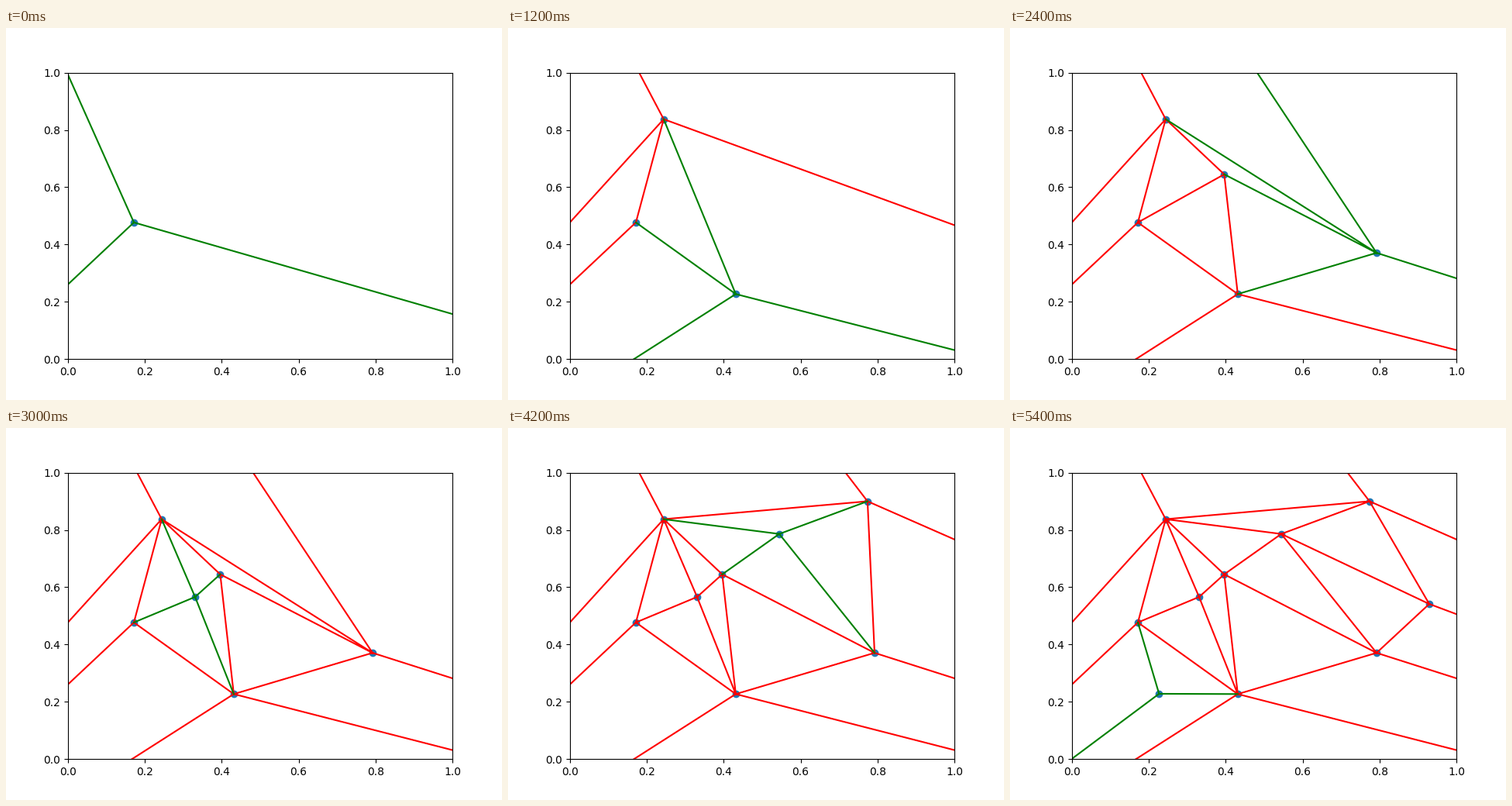
Recreate the animation shown at these times as a matplotlib script. Size 640 by 480 pixels, loop 6 s.

```python
import matplotlib.pyplot as plt
import numpy as np
from matplotlib.animation import FuncAnimation

# Corners of the enclosing triangle
NODES = {"A": (-1, 4), "B": (4, -1), "C": (-1, -1)}

# Each step: x, y, nodes joined to the new point, edges flipped away
STEPS = [
    (0.1714, 0.4770, "ABC", []),
    (0.2437, 0.8375, "ABC0", ["0A"]),
    (0.4312, 0.2270, "BC01", ["0B"]),
    (0.3960, 0.6450, "B012", ["12"]),
    (0.7923, 0.3708, "AB123", ["1B", "3B"]),
    (0.3306, 0.5660, "0123", ["03"]),
    (0.7740, 0.9000, "AB134", ["4A", "14"]),
    (0.5444, 0.7860, "1346", ["36"]),
    (0.9294, 0.5415, "B467", ["46"]),
    (0.2265, 0.2280, "C02", []),
]
for i, (x, y, _, _) in enumerate(STEPS):
    NODES[str(i)] = (x, y)


def edge(a, b):
    return "".join(sorted(a + b))


def triangulate(last):
    """Return the older edges and the edges added by step `last`."""
    old, new = [], []
    for i in range(last + 1):
        joined, flipped = STEPS[i][2:]
        cut = {edge(*e) for e in flipped}
        old = [e for e in old + new if e not in cut]
        new = [edge(str(i), n) for n in joined]
    return old, new


def set_edges(line, edges):
    gap = (np.nan, np.nan)
    pts = [p for a, b in edges for p in (NODES[a], NODES[b], gap)]
    line.set_data(*zip(*(pts or [gap])))


fig, ax = plt.subplots(figsize=(6.4, 4.8), dpi=100)
ax.set(xlim=(0, 1), ylim=(0, 1))
dots = ax.scatter([], [])
old_line, = ax.plot([], [], color="red")
new_line, = ax.plot([], [], color="green")


def update(step):
    old, new = triangulate(step)
    set_edges(old_line, old)
    set_edges(new_line, new)
    dots.set_offsets([s[:2] for s in STEPS[:step + 1]])
    return dots, old_line, new_line


anim = FuncAnimation(fig, update, frames=len(STEPS), interval=600,
                     init_func=lambda: update(0), repeat=True)
plt.show()
```
